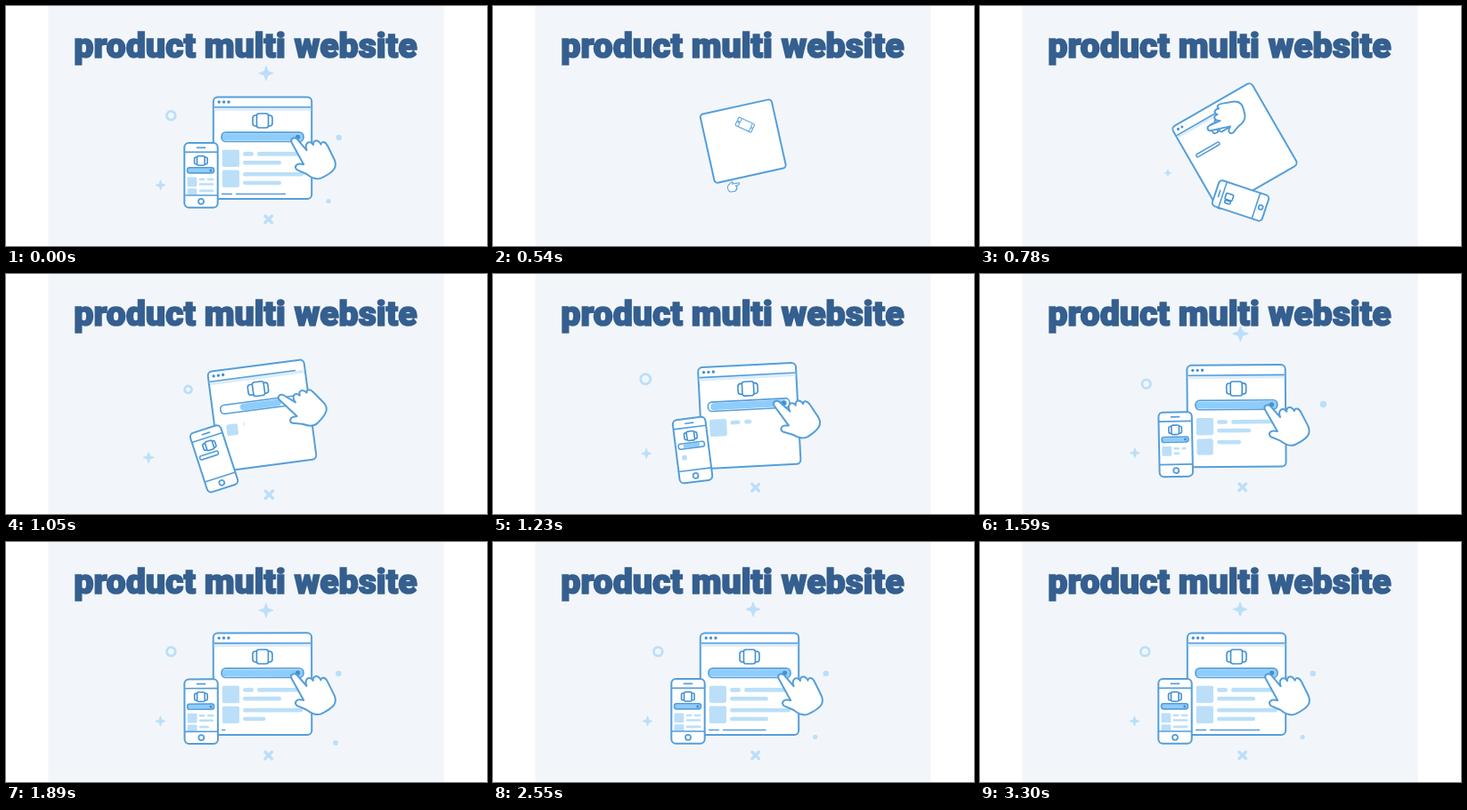
An HTML page with a canvas that plays this animation: 540x270 px, repeating every 3.51 s.

```html
<!DOCTYPE html>
<html lang="en">
<head>
<meta charset="utf-8">
<title>Product multi website</title>
<style>
  html, body { margin: 0; width: 100%; height: 100%; overflow: hidden; background: #fff; }
  canvas { display: block; }
</style>
</head>
<body>
<canvas id="stage" width="540" height="270"></canvas>
<script>
const ctx = document.getElementById('stage').getContext('2d');
const LOOP = 3510, STEP = 30, BUILD = 300;
const LINE = '#559eda', DEEP = '#4390d2', PALE = '#bbdff9', FILL = '#8ecdfb', WHITE = '#fff';
const TITLE = 'product multi website', TITLE_LEFT = 77, TITLE_WIDTH = 385;
const CENTER = { x: 288, y: 159.5 };

// Ornaments spring outwards from the centre to (x, y)
const ornaments = [
  { x: 294.7, y: 240, start: 640, draw: drawCross },
  { x: 173.5, y: 201.5, start: 665, draw: () => drawStar(5.6) },
  { x: 185.3, y: 123.2, start: 905, draw: () => disc(0, 0, 4.9, null, PALE, 2.8) },
  { x: 292, y: 75.7, start: 1180, draw: () => drawStar(8.2) },
  { x: 373.7, y: 148, start: 1270, draw: () => disc(0, 0, 3.3, PALE) },
  { x: 362, y: 219.5, start: 1630, draw: () => disc(0, 0, 2.6, PALE) }
];

function progress(t, start, duration) {
  const u = Math.min(1, Math.max(0, (t - start) / duration));
  return 1 - (1 - u) ** 2;
}

const spring = age => 1 - Math.exp(-age / 180) * Math.cos(Math.PI * age / 400);

// One decaying full turn around a pivot while growing to full size
function swirl(t, start, pivot, drift, draw) {
  const age = t - start;
  if (age <= 0) return;
  const rest = Math.exp(-age / 195);
  const scale = (1 - Math.exp(-age / 165)) ** 1.3;
  ctx.save();
  ctx.translate(pivot.x - drift * rest, pivot.y - drift * rest);
  ctx.rotate(-2 * Math.PI * rest);
  ctx.scale(scale, scale);
  ctx.translate(-pivot.x, -pivot.y);
  draw(t);
  ctx.restore();
}

// Line widths stay the same on screen while parts grow
function paint(fill, stroke, width = 2) {
  if (fill) { ctx.fillStyle = fill; ctx.fill(); }
  if (stroke) {
    const { a, b } = ctx.getTransform();
    ctx.strokeStyle = stroke;
    ctx.lineWidth = width / Math.max(.5, Math.hypot(a, b));
    ctx.stroke();
  }
}

function box(x, y, w, h, r, fill, stroke, width) {
  ctx.beginPath();
  ctx.roundRect(x, y, w, h, r);
  paint(fill, stroke, width);
}

function disc(x, y, r, fill, stroke, width) {
  ctx.beginPath();
  ctx.arc(x, y, r, 0, Math.PI * 2);
  paint(fill, stroke, width);
}

function line(x1, y1, x2, y2, color, width, cap = 'butt') {
  ctx.beginPath();
  ctx.moveTo(x1, y1);
  ctx.lineTo(x2, y2);
  ctx.lineCap = cap;
  paint(null, color, width);
}

function growBar(x1, x2, y, p) {
  if (p > 0) box(x1, y - 2.3, (x2 - x1) * p, 4.6, 2.3, PALE);
}

function growSquare(x, y, size, p) {
  const s = size * p, inset = (size - s) / 2;
  if (p > 0) box(x + inset, y + inset, s, s, 2, PALE);
}

// Two blocks of a thumbnail with text lines
function feed(x, y, scale, width, t) {
  ctx.save();
  ctx.translate(x, y);
  ctx.scale(scale, scale);
  for (let block = 0; block < 2; block++) {
    const top = 22.8 * block, start = 940 + 450 * block;
    growSquare(0, top, 19.3, progress(t, start, 260));
    if (block === 0) {
      growBar(23.3, 35.3, top + 4.6, progress(t, start + 100, 250));
      growBar(39.3, Math.min(88, width), top + 4.6, progress(t, start + 250, 450));
    } else {
      growBar(23.3, width, top + 4.6, progress(t, start + 100, 450));
    }
    growBar(23.3, Math.min(66.3, width), top + 14.4, progress(t, start + 320, 500));
  }
  ctx.restore();
}

function icon(x, y, size, p) {
  if (p <= 0) return;
  ctx.save();
  ctx.translate(x, y);
  ctx.scale(size, size);
  const gap = (1 - p) * 6;
  box(-11 - gap, -6, 6, 12, [3, 0, 0, 3], WHITE, DEEP, 1.6);
  if (p > .6) box(5, -6, 6, 12, [0, 3, 3, 0], WHITE, DEEP, 1.6);
  box(-6.5, -8, 13, 16, 2.5, WHITE, DEEP, 1.6);
  ctx.restore();
}

// Search bar: the outline opens first, then its filling spreads
function searchBar(x, y, w, h, t, start) {
  const shell = progress(t, start, 420), fill = progress(t, start + 230, 400);
  if (shell <= 0) return;
  const tall = h * shell;
  box(x, y - tall / 2, w * shell, tall, tall / 2.3, WHITE);
  if (fill > 0) box(x + w / 2 * (1 - fill), y - h * .38, w * fill, h * .76, h * .38, FILL);
  box(x, y - tall / 2, w * shell, tall, tall / 2.3, null, LINE, 1.6);
  if (fill > .7) disc(x + w - h * .62, y, h * .25, DEEP);
}

function drawWindow(t) {
  box(232.8, 102.4, 110.4, 114.6, 5, WHITE, LINE);
  const head = progress(t, 560, 700);
  if (head > 0) {
    ctx.fillStyle = '#dcedfb';
    ctx.fillRect(233.8, 114, 108.4 * Math.min(1, head * 1.2), 3.8);
    line(233.8, 113.8, 233.8 + 108.4 * head, 113.8, LINE, 1.6);
  }
  for (let i = 0; i < 3; i++) {
    const p = progress(t, 580 + i * 90, 150);
    if (p > 0) disc(239.2 + i * 5.4, 108, 1.7 * p, DEEP);
  }
  icon(288, 129, 1, progress(t, 600, 780));
  searchBar(242, 147.3, 92, 10.4, t, 700);
  feed(242.7, 161.8, 1, 91.3, t);

  const foot = 242 + 72 * progress(t, 1860, 1020);
  if (foot > 242.5) line(242, 211.5, Math.min(254, foot), 211.5, LINE, 1.6);
  if (foot > 258) line(258, 211.5, foot, 211.5, LINE, 1.6);
}

function drawPhone(t) {
  box(200.3, 154.1, 37.4, 72.6, 5, WHITE, LINE);
  ctx.save();
  ctx.beginPath();
  ctx.rect(201, 164, 36, 48.5);
  ctx.clip();
  feed(203.5, 192.5, .56, 53.5, t - 210);
  ctx.restore();
  line(200.3, 164.4, 237.7, 164.4, LINE, 1.6);
  line(200.3, 213, 237.7, 213, LINE, 1.6);
  line(214.5, 159.4, 223.5, 159.4, LINE, 1.7, 'round');
  disc(219, 219.8, 3, WHITE, LINE, 1.8);
  icon(218.8, 174, .66, progress(t, 640, 620));
  searchBar(203.5, 184.9, 30, 6, t, 840);
}

function drawHand() {
  ctx.beginPath();
  ctx.moveTo(320.6, 153.5);
  ctx.bezierCurveTo(318.7, 149.2, 324, 146.5, 327.2, 150.2);
  ctx.lineTo(337.6, 162.3);
  ctx.bezierCurveTo(334.8, 155, 340.3, 149.7, 344.9, 156.2);
  ctx.bezierCurveTo(344.9, 150.2, 350.4, 149.7, 353.6, 155.7);
  ctx.bezierCurveTo(354.4, 151.3, 359, 152.8, 361, 157.3);
  ctx.lineTo(368.9, 173.3);
  ctx.bezierCurveTo(372, 181.4, 368.6, 186.4, 354.4, 193.4);
  ctx.bezierCurveTo(347.9, 196.4, 342.4, 193, 337.4, 189);
  ctx.lineTo(326.8, 184.4);
  ctx.bezierCurveTo(322.8, 181, 326.3, 177.4, 329.8, 177.6);
  ctx.lineTo(334.2, 178.2);
  ctx.closePath();
  ctx.lineJoin = 'round';
  paint(WHITE, LINE);
}

function drawStar(r) {
  ctx.beginPath();
  for (let i = 0; i < 8; i++) {
    const angle = i * Math.PI / 4, d = i % 2 ? r * .38 : r;
    ctx.lineTo(Math.cos(angle) * d, Math.sin(angle) * d);
  }
  ctx.closePath();
  ctx.lineJoin = 'round';
  paint(PALE, PALE, .8);
}

function drawCross() {
  line(-3.8, -3.8, 3.8, 3.8, PALE, 3.4, 'round');
  line(-3.8, 3.8, 3.8, -3.8, PALE, 3.4, 'round');
}

function drawOrnament({ x, y, start, draw }, t) {
  if (t <= start) return;
  const reach = spring(t - start);
  ctx.save();
  ctx.translate(CENTER.x + (x - CENTER.x) * reach, CENTER.y + (y - CENTER.y) * reach);
  ctx.scale(reach, reach);
  draw();
  ctx.restore();
}

// Bold text thickened by an outline
function drawTitle() {
  const weight = 1.7;
  const font = size => `900 ${size}px Roboto, Inter, sans-serif`;
  ctx.font = font(100);
  const m = ctx.measureText(TITLE);
  const ratio = (TITLE_WIDTH - weight) / (m.actualBoundingBoxLeft + m.actualBoundingBoxRight);
  const x = TITLE_LEFT + weight / 2 + m.actualBoundingBoxLeft * ratio;
  ctx.font = font(100 * ratio);
  ctx.fillStyle = ctx.strokeStyle = '#355f8f';
  ctx.lineWidth = weight;
  ctx.lineJoin = 'miter';
  ctx.miterLimit = 2;
  ctx.fillText(TITLE, x, 57.6);
  ctx.strokeText(TITLE, x, 57.6);
}

function render(time) {
  ctx.fillStyle = WHITE;
  ctx.fillRect(0, 0, 540, 270);
  ctx.fillStyle = '#f2f6fa';
  ctx.fillRect(47.5, 0, 444, 270);
  drawTitle();

  // The finished picture shows for one step before the build starts over
  const t = time < STEP ? LOOP : time;
  if (t < BUILD) return;
  ornaments.forEach(ornament => drawOrnament(ornament, t));
  swirl(t, BUILD - 5, CENTER, 26, drawWindow);
  swirl(t, 465, CENTER, 8, drawPhone);
  swirl(t, 470, { x: 272, y: 185 }, 0, drawHand);
}

const began = performance.now();
function tick() {
  const time = (performance.now() - began) % LOOP;
  render(Math.floor(time / STEP) * STEP);
  requestAnimationFrame(tick);
}
tick();
</script>
</body>
</html>
```
